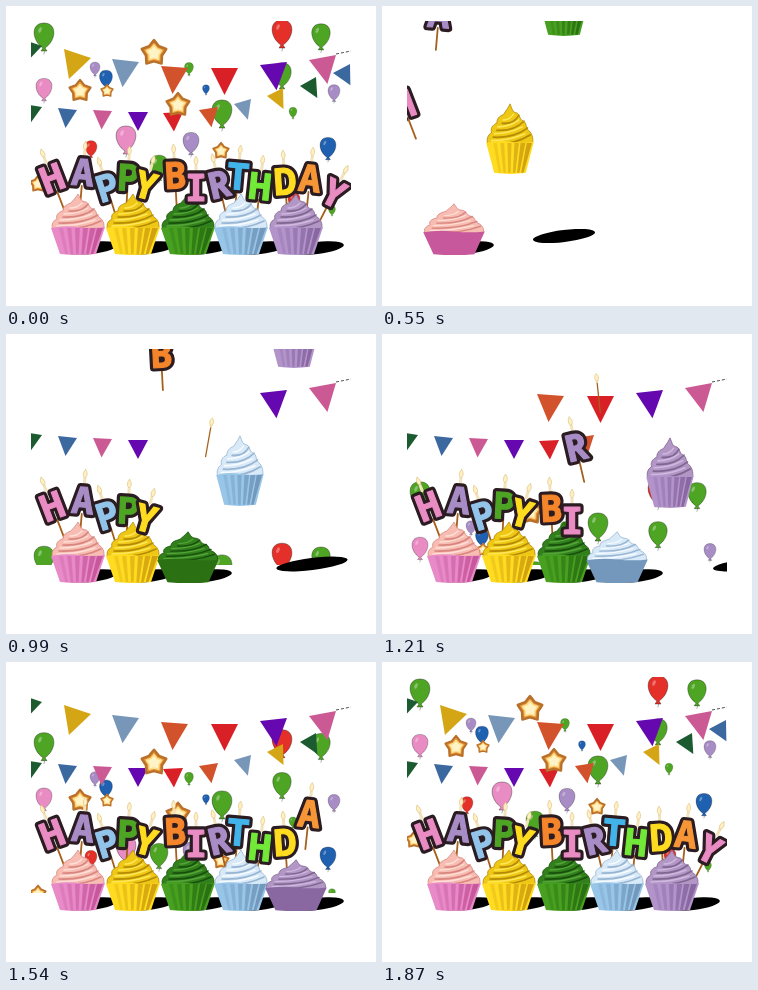
Recreate the animation shown at these times as an HTML page. Size 370x300 px, loop 1.98 s.

```html
<!DOCTYPE html>
<html lang="en">
<head>
<meta charset="utf-8">
<title>Happy Birthday</title>
<style>
  html, body { margin: 0; width: 100%; height: 100%; overflow: hidden; background: #fff; }
  svg { display: block; width: 370px; height: 300px; }
  text { font: 800 37px "Noto Sans Mono", "DejaVu Sans Mono", monospace; text-anchor: middle; stroke-linejoin: round; }
</style>
</head>
<body>
<svg viewBox="0 0 370 300">
  <defs>
    <clipPath id="view"><rect x="25" y="15" width="320" height="236"/></clipPath>
    <clipPath id="sky"><rect x="25" y="15" width="320" height="216"/></clipPath>
  </defs>
  <g id="scene" clip-path="url(#view)"></g>
</svg>
<script>
const STEP = 110, STEPS = 18, LAST = STEPS - 1;
const scene = document.getElementById('scene');

const C = {
  red: '#e5302a', crimson: '#d92026', green: '#4ea524', pink: '#ea8cc4', rose: '#cb5a94',
  purple: '#a88cc6', violet: '#6608b0', blue: '#2060b0', sky: '#92c4ea', slate: '#7896b8',
  denim: '#3c68a0', gold: '#d4a514', rust: '#d2522c', forest: '#1c5a30', cream: '#fff0c4',
  stick: '#a5601c', outline: '#2b1c22'
};

// x, liner, liner shade, frosting, frosting shade, frosting light
const cakes = [
  [72, '#e88ac8', '#c8589c', '#f7bdb2', '#d98680', '#ffdfd6'],
  [127, '#ffdc20', '#d2a210', '#eec814', '#b48a06', '#ffe75a'],
  [182, '#47a01f', '#2b7013', '#32801c', '#17500c', '#55a53a'],
  [235, '#98c6e8', '#7398bc', '#d8e9f8', '#98b5d2', '#f6fbff'],
  [290, '#b294ca', '#8968a2', '#b196c6', '#80668f', '#cfb9df']
];

// glyph, x, y, tilt, colour, landing step, sideways drift, tilt if seen edge-on while falling
const letters = [
  ['H', 46, 172, -21, C.pink, 6, -25],
  ['A', 77, 166, 5, C.purple, 7, -20],
  ['P', 101, 181, -17, C.sky, 8, -24],
  ['P', 122, 171, 3, C.green, 9, -19],
  ['Y', 140, 179, 16, '#ffdc20', 8.7, 29, 10],
  ['B', 169, 169, -3, '#f5852a', 10.9, -14],
  ['I', 190, 181, 0, C.pink, 10.2, 15, 10],
  ['R', 213, 178, -13, C.purple, 11.9, -21],
  ['T', 232, 170, 5, '#42b4ea', 12.6, -17, -6],
  ['H', 254, 180, 6, '#72e838', 14, 14],
  ['D', 279, 175, -4, '#ffdc20', 14, -12],
  ['A', 304, 172, 6, '#f79636', 14.3, -3],
  ['Y', 328, 187, 27, C.pink, 17, 15]
];

// resting x, resting y, scale, colour, rise factor
const balloons = [
  [276, 26, 1, C.red, 1], [315, 29, 0.93, C.green, 1], [38, 29, 1, C.green, 1],
  [38, 82, 0.8, C.pink, 1], [89, 62, 0.5, C.purple, 1], [100, 72, 0.65, C.blue, 1],
  [183, 62, 0.45, C.green, 1], [276, 68, 0.93, C.green, 1], [216, 106, 1, C.green, 0.65],
  [200, 83, 0.35, C.blue, 1], [328, 86, 0.6, C.purple, 1], [287, 106, 0.4, C.green, 1],
  [85, 142, 0.6, C.red, 1], [120, 132, 1, C.pink, 1], [185, 136, 0.8, C.purple, 1],
  [322, 141, 0.8, C.blue, 1], [153, 160, 0.9, C.green, 0.6], [288, 194, 0.6, C.red, 1],
  [326, 204, 0.35, C.green, 0.5]
];

// resting x, resting y, radius
const stars = [[148, 47, 14], [74, 85, 12], [172, 99, 13], [101, 85, 7], [215, 145, 9], [32, 178, 9]];

// top edge of every flag, then its colour; each row appears one flag per step
const upperFlags = [
  [303, 54, 330, 49, C.rose], [254, 59, 281, 56, C.violet], [205, 62, 232, 62, C.crimson],
  [155, 60, 182, 62, C.rust], [106, 53, 133, 56, C.slate], [58, 43, 85, 52, C.gold],
  [12, 32, 36, 40, C.forest]
];
const lowerFlags = [
  [17, 98, 36, 101, C.forest], [52, 102, 71, 104, C.denim], [87, 104, 106, 105, C.rose],
  [122, 106, 142, 106, C.violet], [157, 107, 177, 106, C.crimson], [193, 104, 212, 101, C.rust],
  [228, 98, 245, 93, C.slate], [261, 90, 277, 82, C.gold], [294, 80, 310, 71, C.forest],
  [327, 67, 344, 58, C.denim]
];

const group = (transform, body) => `<g transform="${transform}">${body}</g>`;
const path = (d, fill, extra = '') => `<path d="${d}" fill="${fill}" ${extra}/>`;
const line = (d, color, width) => path(d, 'none', `stroke="${color}" stroke-width="${width}" stroke-linecap="round"`);
const ellipse = (x, y, rx, ry, fill, extra = '') =>
  `<ellipse cx="${x}" cy="${y}" rx="${rx}" ry="${ry}" fill="${fill}" ${extra}/>`;

const rise = left => 14 * left + 1.3 * left * left;

function balloon([x, y, size, color, speed], step) {
  return group(`translate(${x} ${y + speed * rise(LAST - step)}) scale(${size})`,
    line('M0 12Q2 15 0 19', '#777', 0.6) +
    path('M0-12C14-12 12 6 1 13L3 16H-3L-1 13C-12 6-14-12 0-12Z', color, 'stroke="#0005" stroke-width="1"') +
    ellipse(-4, -5, 1.5, 3, '#fff5', 'transform="rotate(25 -4 -5)"'));
}

function star([x, y, radius], step) {
  const points = Array.from({ length: 10 }, (_, i) => {
    const r = i % 2 ? 0.6 : 0.92, a = (i * 36 - 90) * Math.PI / 180;
    return `${(r * Math.cos(a)).toFixed(3)},${(r * Math.sin(a)).toFixed(3)}`;
  }).join(' ');
  const shape = (size, fill, edge) =>
    `<polygon points="${points}" transform="scale(${size})" fill="${fill}" stroke="${edge}" stroke-width=".18" stroke-linejoin="round"/>`;
  return group(`translate(${x} ${y + rise(LAST - step)})`,
    shape(radius, '#e99a3c', '#b8702a') + shape(radius * 0.62, '#fff4c8', '#ffdf8c'));
}

function flag([x1, y1, x2, y2, color], height) {
  const dx = x2 - x1, dy = y2 - y1, len = Math.hypot(dx, dy);
  const tipX = (x1 + x2) / 2 - dy / len * height, tipY = (y1 + y2) / 2 + dx / len * height;
  return path(`M${x1} ${y1}L${x2} ${y2}L${tipX} ${tipY}Z`, color);
}

function cakeShadow(i, step) {
  const n = step - 1 - 2 * i, x = cakes[i][0];
  if (n < 1) return '';
  const air = Math.max(0, 3 - n);
  const cx = air ? x + (47 + 8 * i) * air : x + 13 + 2 * i;
  const cy = 242 - 12 * air;
  return ellipse(cx, cy, air ? 29 + 2.3 * i : 27, 6, '#000', `transform="rotate(-7 ${cx} ${cy})"`);
}

function cake(i, step) {
  const [x, liner, linerShade, cream, creamShade, creamLight] = cakes[i];
  const n = step - 1 - 2 * i;
  if (n < 0) return '';
  const falling = n < 3, squashed = n === 4 || n === 5;
  const y = falling ? 26 + 2 * i + 62 * n + 4 * n * n : 249;
  const [sx, sy] = falling ? [0.88, 1.15] : squashed ? [1.14, 0.84] : [1, 1];
  const pleats = [-19, -11, -3, 5, 12, 19].map((p, j) =>
    path(`M${p} -27H${p + 4 + j * 0.4}L${(p + 4) * 0.67} -1H${p * 0.67}Z`, linerShade, `opacity="${0.3 + j * 0.14}"`)).join('');
  const swirls = [[-24, -30, 23, -36], [-21, -36, 20, -42], [-17, -42, 16, -48], [-11, -48, 10, -53]]
    .map(([a, b, c, d]) =>
      line(`M${a + 2} ${b + 4}Q${(a + c) / 2 + 5} ${b + 5} ${c} ${d + 2}`, creamShade, 1.6) +
      line(`M${a + 3} ${b + 1}Q${(a + c) / 2} ${b + 1} ${c - 6} ${d + 1}`, creamLight, 1.4)).join('');
  return group(`translate(${x + (falling ? 2 - i : 0)} ${y}) scale(${sx} ${sy})`,
    path('M-25-25C-28-32-23-35-21-36C-23-41-17-44-15-44C-15-50-9-51-7-52C-5-55-3-56 0-61C3-56 2-54 8-53C12-51 10-48 15-46C20-44 17-40 21-38C26-35 27-29 25-25Z',
      cream, `stroke="${creamShade}" stroke-width=".8"`) + swirls +
    path('M-27-27Q-14-30 0-28T27-28L18-1Q0 1-18-1Z', squashed ? linerShade : liner) +
    (squashed ? '' : pleats));
}

// Returns the stick and the face apart, as the frosting lies between them.
function letter([glyph, x, y, tilt, color, landing, drift, edgeTilt], step) {
  const left = Math.max(0, landing - step);
  const fall = 67 * left + 6 * left * left;
  if (fall > y + 40) return { stick: '', face: '' };
  const dip = !left && step - landing < 1 && step < LAST ? 5 : 0;
  const thin = edgeTilt && left;
  const place = `translate(${x + drift * Math.min(left, 1)} ${y - fall + dip}) rotate(${thin ? edgeTilt : tilt})`;
  const glyphs = thin ? '' :
    `<text y="13.5" fill="${C.outline}" stroke="${C.outline}" stroke-width="7.5">${glyph}</text>` +
    `<text y="13.5" fill="${color}" stroke="${color}" stroke-width="1.2">${glyph}</text>`;
  const flame = thin ? 'M0-8Q4-4 0 0Q-4-4 0-8Z' : 'M0-31Q4-25 0-22Q-4-25 0-31Z';
  return {
    stick: group(place, line(`M0 ${thin ? -2 : 14}V${thin ? 31 : 36}`, C.stick, thin ? 1.3 : 1.8)),
    face: group(place, line(thin ? 'M0-3V0' : 'M0-22V-16', '#f3e3bc', 3) +
      path(flame, C.cream, 'stroke="#dcc07c" stroke-width=".6"') + glyphs)
  };
}

function draw(step) {
  const shown = (flags, first, height) =>
    flags.slice(0, Math.max(0, step - first + 1)).map(f => flag(f, height)).join('');
  const string = step > 7 ? path('M330 48L345 45', 'none', 'stroke="#222" stroke-width=".8" stroke-dasharray="3 2"') : '';
  const parts = letters.map(l => letter(l, step));
  scene.innerHTML =
    `<g clip-path="url(#sky)">` +
    balloons.map(b => balloon(b, step)).join('') +
    shown(upperFlags, 8, 27) + shown(lowerFlags, 6, 19) + string +
    stars.map(s => star(s, step)).join('') + '</g>' +
    cakes.map((_, i) => cakeShadow(i, step)).join('') +
    parts.map(p => p.stick).join('') +
    cakes.map((_, i) => cake(i, step)).join('') +
    parts.map(p => p.face).join('');
}

let current = -1;
function tick() {
  const step = Math.floor(performance.now() / STEP) % STEPS;
  if (step !== current) {
    current = step;
    draw(step || LAST); // the loop opens on the finished scene
  }
  requestAnimationFrame(tick);
}
tick();
</script>
</body>
</html>
```
